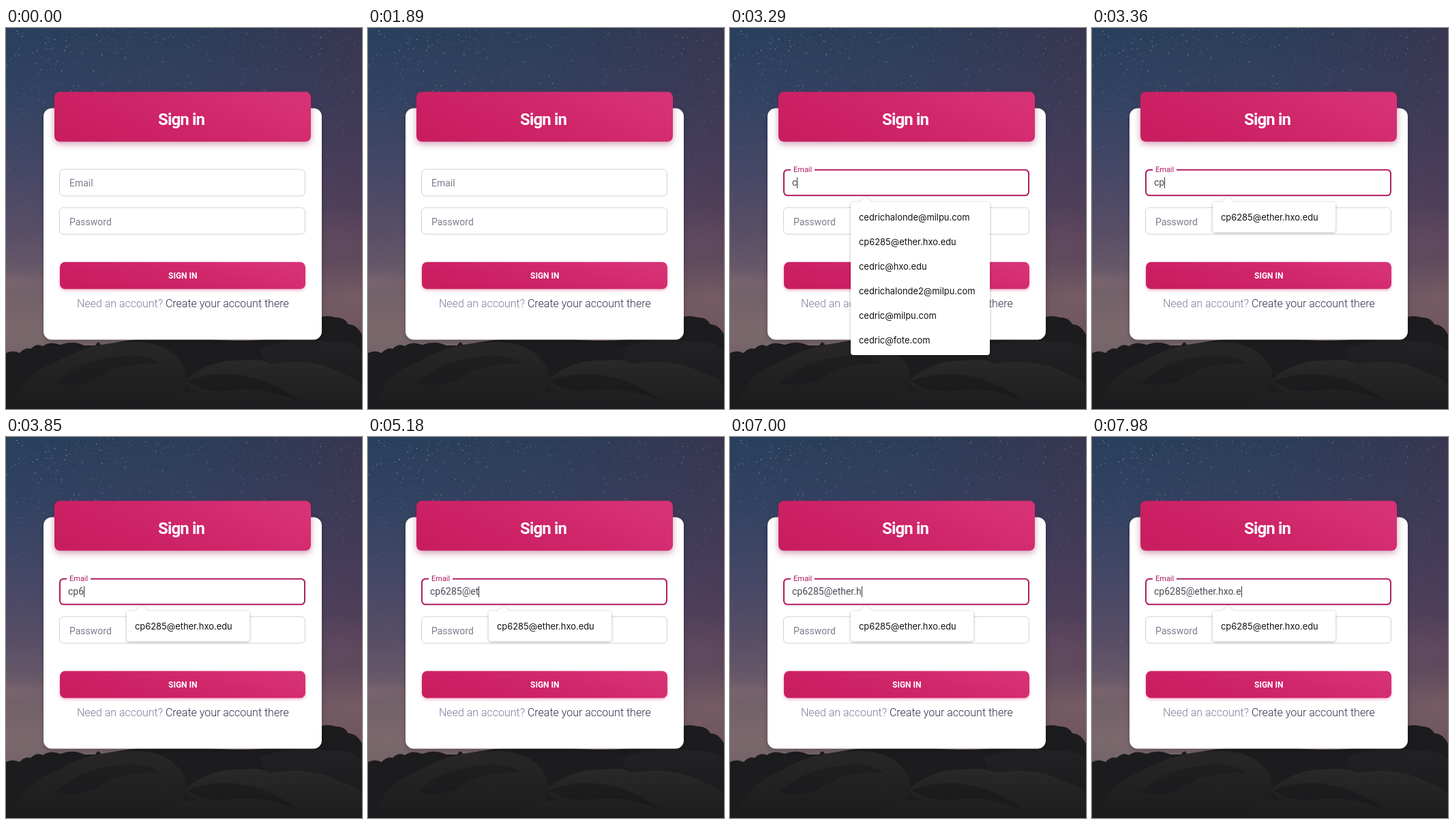
Recreate the animation shown at these times as an HTML page with a canvas. Size 522 by 558 pixels, loop 8 s.

```html
<!DOCTYPE html>
<html lang="en">
<head>
<meta charset="utf-8">
<title>Sign in</title>
<style>
  html, body { margin: 0; width: 100%; height: 100%; overflow: hidden; background: #1b1a1d; }
  canvas, svg { position: absolute; left: 0; top: 0; width: 522px; height: 558px; }
  text { font-family: Roboto, sans-serif; font-size: 14px; white-space: pre; }
  .card { filter: drop-shadow(0 2px 3px rgba(0, 0, 0, .25)); }
  .head { filter: drop-shadow(0 3px 6px rgba(90, 20, 60, .26)) drop-shadow(0 3px 3px rgba(216, 27, 96, .16)); }
  .btn { filter: drop-shadow(0 2px 2px rgba(216, 27, 96, .35)); }
  .title { font-size: 24px; font-weight: 700; letter-spacing: -.85px; fill: #fff; }
  .cta { font-size: 12px; font-weight: 700; fill: #fff; }
  .hint { fill: #7d7d8e; }
  .foot { font-size: 16px; font-weight: 300; fill: #7b809a; }
  .foot tspan { fill: #30304a; }
  .box { fill: #fff; stroke: #d0d2d6; }
  .typed { fill: #494c58; }
  .popup { filter: drop-shadow(0 1px 2px rgba(0, 0, 0, .28)); }
  .popup text { font-family: Inter, sans-serif; font-size: 12.9px; fill: #111; }
</style>
</head>
<body>
<canvas id="sky" width="522" height="558"></canvas>
<svg viewBox="0 0 522 558">
  <defs>
    <linearGradient id="pink" x1="0" y1=".7" x2="1" y2=".3">
      <stop offset="0" stop-color="#c81e60"/>
      <stop offset=".5" stop-color="#cf2569"/>
      <stop offset="1" stop-color="#d83277"/>
    </linearGradient>
  </defs>
  <rect class="card" x="55" y="117.5" width="408" height="339" rx="12" fill="#fff"/>
  <rect class="head" x="71" y="93.5" width="376" height="73" rx="8" fill="url(#pink)"/>
  <text class="title" x="223" y="142">Sign in</text>

  <rect id="field" class="box" x="78.5" y="207" width="360" height="39" rx="6"/>
  <g id="focus">
    <rect x="79" y="207.7" width="359" height="37.6" rx="5.5" fill="none" stroke="#b01c61" stroke-width="2"/>
    <rect id="notch" x="89" y="205" width="35" height="5" fill="#fff"/>
  </g>
  <text id="label" class="hint">Email</text>
  <text id="typed" class="typed" x="91" y="231"></text>
  <rect id="caret" y="218.5" width="1" height="16" fill="#333"/>

  <rect class="box" x="78.5" y="263" width="360" height="39" rx="6"/>
  <text class="hint" x="93" y="288.5">Password</text>

  <rect class="btn" x="79" y="342.7" width="360" height="39.6" rx="7.5" fill="url(#pink)"/>
  <text class="cta" x="238" y="367">SIGN IN</text>
  <text class="foot" x="104" y="409">Need an account? <tspan>Create your account there</tspan></text>

  <g id="popup" class="popup">
    <rect id="panel" x="177" y="255" rx="4" fill="#fff"/>
    <path d="M189 256L199 247L209 256Z" fill="#fff"/>
    <g id="rows"></g>
  </g>
</svg>
<script>
  const $ = id => document.getElementById(id);
  const LOOP = 8000, FOCUS = 2870, OPEN = 2940, NARROW = 3360;
  const EMAIL = 'cp6285@ether.hxo.edu';
  const ALL = ['cedrichalonde@milpu.com', EMAIL, 'cedric@hxo.edu',
    'cedrichalonde2@milpu.com', 'cedric@milpu.com', 'cedric@fote.com'];
  // Time of each keystroke
  const KEYS = [3290, 3360, 3850, 4060, 4270, 4480, 4760, 5040, 5180,
    5460, 5600, 5950, 6370, 6720, 7140, 7350, 7490, 7770];

  function paintSky() {
    const c = $('sky').getContext('2d');
    let seed = 17;
    const rnd = () => (seed = seed * 16807 % 2147483647) / 2147483647;
    const ramp = (x, y, ...stops) => {
      const g = c.createLinearGradient(0, 0, x, y);
      stops.forEach(([p, color]) => g.addColorStop(p, color));
      return g;
    };
    const wash = fill => { c.fillStyle = fill; c.fillRect(0, 0, 522, 558); };
    const glow = (x, y, rx, ry, rgb, alpha) => {
      c.save();
      c.translate(x, y);
      c.scale(rx, ry);
      const g = c.createRadialGradient(0, 0, 0, 0, 0, 1);
      g.addColorStop(0, `rgba(${rgb},${alpha})`);
      g.addColorStop(1, `rgba(${rgb},0)`);
      c.fillStyle = g;
      c.fillRect(-1, -1, 2, 2);
      c.restore();
    };
    const shape = (d, fill) => { c.fillStyle = fill; c.fill(new Path2D(d)); };

    wash(ramp(0, 480, [0, '#283f5b'], [.22, '#334362'], [.45, '#474766'],
      [.62, '#584e66'], [.72, '#655768'], [.82, '#74626a'], [.92, '#7a686c'], [1, '#736468']));
    wash(ramp(522, -60, [0, 'rgba(72,38,62,0)'], [.5, 'rgba(72,38,62,.08)'], [1, 'rgba(78,42,66,.42)']));
    glow(500, 310, 110, 50, '135,95,112', .2);
    glow(510, 395, 100, 60, '150,118,115', .32);
    glow(0, 372, 100, 18, '160,122,122', .25);

    for (let i = 0; i < 2800; i++) {
      const x = rnd() * 522, y = rnd() ** 1.3 * 360, s = .7 + rnd() * .7;
      const fade = (1 - y / 400) * (1 - x / 1200);
      c.fillStyle = `rgba(180,195,215,${(.1 + rnd() ** 4 * .65) * fade})`;
      c.fillRect(x, y, s, s * 1.2);
    }

    shape(`M0 476Q10 471 20 476Q28 467 36 470Q45 461 54 466Q64 458 80 464Q98 457 115 465
      L131 465Q135 456 140 465Q210 448 300 456Q400 464 425 440Q435 428 450 430
      Q464 418 484 424Q496 423 502 434Q514 434 522 449V558H0Z`, '#1c1b1e');
    shape('M8 558Q22 508 72 490Q122 460 180 460Q240 456 262 498Q272 530 240 558Z',
      ramp(0, 558, [.8, '#2a2829'], [1, '#1c1b1d']));
    shape('M372 470Q425 448 472 460Q510 456 522 474V535H400Z',
      ramp(0, 558, [.8, '#242225'], [.95, '#1b1a1d']));
    shape('M216 558Q240 532 282 532Q258 524 266 513Q302 484 348 487Q372 483 388 492Q450 482 492 506Q516 512 522 524V558Z',
      ramp(0, 558, [.86, '#2b292a'], [1, '#1d1c1e']));
    shape('M266 517Q310 500 356 511Q392 518 430 546Q370 523 330 531Q290 535 266 517Z', 'rgba(14,13,16,.32)');
    shape('M72 520Q110 486 160 482Q200 474 226 492Q170 488 136 512Q108 528 72 520Z', 'rgba(14,13,16,.25)');
  }

  function showRows(list) {
    $('panel').setAttribute('width', list.length > 1 ? 204 : 180);
    $('panel').setAttribute('height', 8 + 36 * list.length);
    $('rows').innerHTML = list.map((mail, i) =>
      `<text x="189" y="${282 + 36 * i}">${mail}</text>`).join('');
  }

  const show = (id, on) => $(id).style.display = on ? '' : 'none';
  const mix = (a, b, k) => a + (b - a) * k;
  let listSize = 0;

  function frame(now) {
    const t = now % LOOP;
    const focused = t >= FOCUS;
    const lift = 1 - (1 - Math.min(Math.max((t - FOCUS + 35) / 175, 0), 1)) ** 3;

    show('focus', focused);
    show('field', !focused);
    show('caret', focused);
    show('popup', t >= OPEN);

    const label = $('label');
    label.setAttribute('transform', `translate(93 ${mix(232, 211, lift)}) scale(${mix(1, .785, lift)})`);
    label.style.fill = focused ? '#b01c61' : '';
    $('notch').setAttribute('width', 35 * lift);

    const typed = $('typed');
    typed.textContent = EMAIL.slice(0, KEYS.filter(k => k <= t).length);
    const width = typed.textContent ? typed.getComputedTextLength() : 0;
    $('caret').setAttribute('x', Math.round(91 + width));

    const list = t < NARROW ? ALL : [EMAIL];
    if (list.length !== listSize) showRows(list);
    listSize = list.length;
    requestAnimationFrame(frame);
  }

  paintSky();
  frame(performance.now());
</script>
</body>
</html>
```
